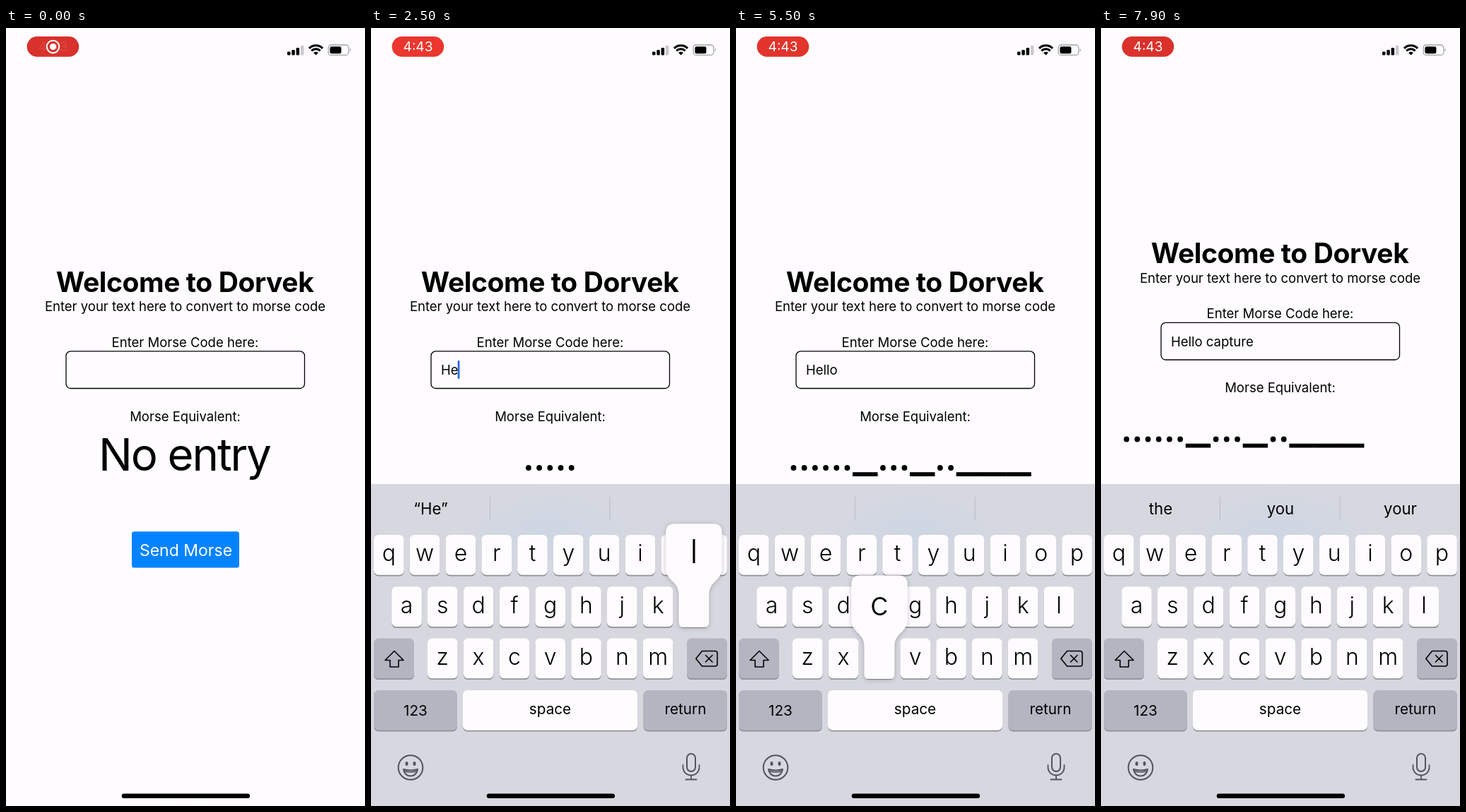
Recreate the animation shown at these times as an HTML page. Size 508 by 1102 pixels, loop 8 s.

```html
<!DOCTYPE html>
<html lang="en">
<head>
<meta charset="utf-8">
<title>Morse keyboard</title>
<style>
  html, body { margin: 0; width: 100%; height: 100%; overflow: hidden; background: #fefcff; }
  svg { display: block; width: 100%; height: 100%; }
  text { font-family: Inter, "Liberation Sans", sans-serif; font-size: 18.5px; white-space: pre; }
  .mid { text-anchor: middle; }
  .line { fill: none; stroke-linecap: round; stroke-linejoin: round; }
</style>
</head>
<body>
<svg id="stage" viewBox="0 0 508 1102" xmlns="http://www.w3.org/2000/svg">
  <defs>
    <radialGradient id="glow">
      <stop offset="0" stop-color="#c8d5e6" stop-opacity=".65"/>
      <stop offset="1" stop-color="#c8d5e6" stop-opacity="0"/>
    </radialGradient>
    <filter id="soft" x="-30%" y="-20%" width="160%" height="140%">
      <feDropShadow dx="0" dy="1" stdDeviation="3" flood-color="#000" flood-opacity=".25"/>
    </filter>
  </defs>
  <rect width="508" height="1102" fill="#fefcff"/>

  <rect id="pill" x="29.6" y="12" width="73.6" height="28.8" rx="14.4"/>
  <g id="rec">
    <circle cx="66.5" cy="26.5" r="8.8" fill="none" stroke="#fff" stroke-width="2"/>
    <circle cx="66.5" cy="26.5" r="4.6" fill="#fff"/>
  </g>
  <text id="clock" class="mid" x="66.5" y="33.3" fill="#fff" style="font-size:19px">4:43</text>

  <g id="status">
    <g fill="none" stroke="#000" stroke-width="3">
      <path d="M429 28.9A13.2 13.2 0 0 1 448 28.9"/>
      <path d="M432.4 32.5A8.4 8.4 0 0 1 444.6 32.5"/>
    </g>
    <path d="M438.5 38.6L435.2 35.2A4.7 4.7 0 0 1 441.8 35.2Z"/>
    <rect x="456.2" y="24" width="28.6" height="14.4" rx="4" fill="none" stroke="#a3a2a6" stroke-width="1.3"/>
    <rect x="458.4" y="26.2" width="16" height="10" rx="2.2"/>
    <path d="M486.6 28.8Q489.4 31.2 486.6 33.6Z" fill="#a3a2a6"/>
  </g>

  <g id="page">
    <text x="70.8" y="373.5" style="font-size:39px;font-weight:700;letter-spacing:-.4px">Welcome to Dorvek</text>
    <text class="mid" x="253.5" y="401">Enter your text here to convert to morse code</text>
    <text class="mid" x="253.5" y="451.7">Enter Morse Code here:</text>
    <rect x="85" y="457.8" width="337.5" height="52.7" rx="6.5" fill="none" stroke="#000" stroke-width="1.3"/>
    <text id="entry" x="99" y="491"></text>
    <rect id="caret" y="471" width="2.8" height="26" rx="1.2" fill="#2a6be0"/>
    <text class="mid" x="253.5" y="556.5">Morse Equivalent:</text>
    <text id="none" class="mid" x="252.5" y="627" style="font-size:63.5px;letter-spacing:-2.1px">No entry</text>
    <g id="code"></g>
    <g id="send">
      <rect x="178" y="713.3" width="152" height="51.2" rx="3.5" fill="#0583ff"/>
      <text class="mid" x="254.5" y="748" fill="#fff" style="font-size:23px">Send Morse</text>
    </g>
  </g>

  <g id="board">
    <rect y="646" width="508" height="490" fill="#d7d8df"/>
    <ellipse cx="254" cy="718" rx="145" ry="75" fill="url(#glow)"/>
    <path d="M168.5 664V698M338 664V698" stroke="#bcbec8" stroke-width="1.2"/>
    <g id="words"></g>
    <g id="keys"></g>
    <path id="shift" class="line" d="M33 882.5L46 895.5H39V905H27V895.5H20Z" stroke="#000" stroke-width="1.6"/>
    <path class="line" d="M468.5 882.5H487Q490 882.5 490 885.5V901Q490 904 487 904H468.5L459.8 893.2ZM473.5 888.5L483 898M483 888.5L473.5 898" stroke="#000" stroke-width="1.6"/>
    <g class="line" stroke="#50545c" stroke-width="2">
      <circle cx="56" cy="1047.5" r="17.3"/>
      <path d="M46 1050Q56 1053 66 1050Q64 1059.5 56 1059.5T46 1050Z"/>
      <path d="M46.5 1052.5Q56 1055.500 65.500 1052.500" stroke-width="1.500"/>
      <rect x="447" y="1028" width="12" height="25" rx="6"/>
      <path d="M441.5 1044V1047.5A11.5 11 0 0 0 464.5 1047.5V1044M453 1058.5V1064.5M445.5 1064.5H460.5" stroke-width="1.8"/>
    </g>
    <g fill="#50545c"><ellipse cx="50.5" cy="1042" rx="2" ry="2.9"/><ellipse cx="61.5" cy="1042" rx="2" ry="2.9"/></g>
    <g id="popup">
      <path id="bulb" fill="#fefcff" filter="url(#soft)"/>
      <text id="big" class="mid" style="font-weight:360"></text>
    </g>
  </g>
  <rect x="163.7" y="1084.6" width="181.4" height="6.4" rx="3.2"/>
</svg>
<script>
const LOOP = 8000, STEP = 100;
const LIGHT = '#fefcff', DARK = '#b3b6c1';
const MID = 253.3, DOT = 15.2, DASH = 35.3, MAX_LINE = 454;
const MORSE = { g: '--.', h: '....', e: '.', l: '.-..', o: '---', c: '-.-.',
  a: '.-', p: '.--.', t: '-', u: '..-', r: '.-.' };
// key, down, up
const PRESSES = [
  ['G', 1300, 1500], ['<', 1800, 1900], ['H', 2100, 2200], ['e', 2300, 2400],
  ['l', 2500, 2700], ['l', 2800, 2900], ['o', 3000, 3100], [' ', 4900, 5000],
  ['c', 5500, 5600], ['a', 5700, 5800], ['p', 5900, 6100], ['t', 6400, 6500],
  ['u', 6600, 6700], ['r', 6800, 6900], ['e', 7000, 7100], [' ', 7200, 7300]
];
const GUESSES = { 'G': ['G', 'G'], 'Hello': ['Hellos', 'Helloing'],
  'Hello cap': ['captain', 'capital'], 'Hello capture ': ['the', 'you', 'your'] };

const $ = id => document.getElementById(id);
function add(parent, tag, attrs, text) {
  const el = document.createElementNS('http://www.w3.org/2000/svg', tag);
  for (const k in attrs) el.setAttribute(k, attrs[k]);
  if (text) el.textContent = text;
  return parent.appendChild(el);
}
const show = (el, on) => el.setAttribute('visibility', on ? 'visible' : 'hidden');

[4.8, 7.4, 10.3, 13.6].forEach((h, i) => add($('status'), 'rect', {
  x: 398 + i * 6.3, y: 38.4 - h, width: 4.5, height: h, rx: 1.1, fill: i < 3 ? '#000' : '#cac9cd'
}));

const caps = {}, letters = {};
function cap(name, x, y, w, fill) {
  add($('keys'), 'rect', { x, y: y + 1.5, width: w, height: 57, rx: 6.5, fill: '#8f9198' });
  caps[name] = add($('keys'), 'rect', { x, y, width: w, height: 56.7, rx: 6.5, fill });
}
['qwertyuiop', 'asdfghjkl', 'zxcvbnm'].forEach((row, r) => {
  const first = [25.3, 50.5, 101.3][r], y = 718 + r * 73.3;
  [...row].forEach((ch, i) => {
    const cx = first + i * 50.8;
    cap(ch, cx - 21.3, y, 42.6, LIGHT);
    letters[ch] = { cx, y, el: add($('keys'), 'text', { class: 'mid', x: cx }, ch) };
  });
});
cap('shift', 4, 864.6, 57, DARK);
cap('<', 447, 864.6, 57, DARK);
cap('123', 4, 938, 118, DARK);
cap(' ', 130, 938, 247, LIGHT);
cap('return', 385.5, 938, 118.5, DARK);
[['123', 63, 974], ['space', 253.5, 972.3], ['return', 445, 972.3]].forEach(([s, x, y]) =>
  add($('keys'), 'text', { class: 'mid', x, y, style: 'font-size:20.7px' }, s));
const words = [84.5, 254, 423.5].map(x => add($('words'), 'text', { class: 'mid', x, y: 689 }));

function stateAt(t) {
  const s = { text: '', since: 100, key: null };
  for (const [key, down, up] of PRESSES) {
    if (t >= up) {
      s.text = key === '<' ? s.text.slice(0, -1) : s.text + key;
      s.since = up;
    } else if (t >= down) s.key = key;
  }
  return s;
}

const widthOf = line => [...line].reduce((w, c) => w + (c === '-' ? DASH : DOT), 0);

function morseLines(text) {
  const code = [...text.toLowerCase()].map(c => MORSE[c] || ' ').join('');
  const lines = [''];
  for (const part of code.match(/[.-]+ ?/g) || []) {
    const last = lines.length - 1;
    if (lines[last] && widthOf(lines[last] + part) > MAX_LINE) lines.push(part);
    else lines[last] += part;
  }
  return lines;
}

function drawMorse(lines) {
  const left = MID - Math.max(...lines.map(widthOf)) / 2;
  $('code').textContent = '';
  lines.forEach((line, n) => {
    let x = left;
    const y = 623 + n * 81;
    for (const c of line) {
      if (c === '.') add($('code'), 'circle', { cx: x + DOT / 2, cy: y, r: 3.9 });
      if (c === '-') add($('code'), 'rect', { x, y: y + 6.2, width: DASH + .2, height: 5.8 });
      x += c === '-' ? DASH : DOT;
    }
  });
}

function drawPopup(key, upper) {
  const k = key && letters[key.toLowerCase()];
  show($('popup'), k);
  if (!k) return;
  const { cx, y } = k, l = cx - 21.3, r = cx + 21.3, b = y + 57.5, T = y - 89;
  const L = Math.min(Math.max(cx - 39.5, 4), 425), R = L + 79;
  $('bulb').setAttribute('d', `M${L} ${T + 12}Q${L} ${T} ${L + 12} ${T}H${R - 12}Q${R} ${T} ${R} ${T + 12}
    V${y - 26}C${R} ${y - 8} ${r} ${y - 8} ${r} ${y + 11}V${b - 6}Q${r} ${b} ${r - 6} ${b}
    H${l + 6}Q${l} ${b} ${l} ${b - 6}V${y + 11}C${l} ${y - 8} ${L} ${y - 8} ${L} ${y - 26}Z`);
  const big = $('big');
  big.textContent = key;
  big.setAttribute('x', (L + R) / 2);
  big.setAttribute('y', y - (upper ? 32 : 33));
  big.style.fontSize = upper ? '44px' : '47px';
}

function drawWords(text, age) {
  const typed = text.split(' ').pop();
  const list = [typed ? `“${typed}”` : '', ...(GUESSES[text] || [])];
  if (!typed && list.length > 1) list.shift();
  const grow = Math.min(age / 300, 1);
  words.forEach((el, i) => {
    const fresh = i > 0 || !typed;
    el.textContent = list[i] || '';
    el.style.fontSize = (fresh && age < 100 ? 16.5 : 22.2) + 'px';
    el.setAttribute('opacity', fresh ? (age < 100 ? .17 : .42 + .58 * grow) : 1);
  });
}

function slide(t) {
  const p = Math.max(0, t - 50) * .0175;
  return t > 600 ? 0 : 456 * (1 + p) * Math.exp(-p);
}

function render(t) {
  const { text, since, key } = stateAt(t);
  const age = t - since, upper = text === '';

  const glow = (1 - Math.cos(t / 1950 * 2 * Math.PI)) / 2;
  $('pill').setAttribute('fill', `rgb(${217 + 30 * glow},${49 + 9 * glow},${43 + 5 * glow})`);
  const rec = t < 400 ? [1, .6, .25, .08][Math.floor(t / 100)] : 0;
  $('rec').setAttribute('opacity', rec);
  $('clock').setAttribute('opacity', rec === 1 ? .1 : 1 - rec);

  const lines = morseLines(text);
  $('page').setAttribute('transform', `translate(0 ${-40.5 * (lines.length - 1)})`);
  $('send').setAttribute('transform', `translate(0 ${81 * (lines.length - 1)})`);
  $('entry').textContent = text;
  $('caret').setAttribute('x', 99.3 + (text ? $('entry').getComputedTextLength() - 1.2 : 0));
  show($('caret'), age >= 0 && age % 1000 < 500);
  show($('none'), upper);
  drawMorse(lines);

  $('board').setAttribute('transform', `translate(0 ${slide(t)})`);
  for (const ch in letters) {
    const { el, y } = letters[ch];
    el.textContent = upper ? ch.toUpperCase() : ch;
    el.setAttribute('y', y + (upper ? 40.3 : 37.3));
    el.style.fontSize = upper ? '30px' : '32px';
    el.style.fontWeight = upper ? 400 : 340;
  }
  $('shift').style.fill = upper ? '#000' : 'none';
  caps.shift.setAttribute('fill', upper ? LIGHT : DARK);
  caps['<'].setAttribute('fill', key === '<' ? LIGHT : DARK);
  caps[' '].setAttribute('fill', key === ' ' ? DARK : LIGHT);
  drawWords(text, age);
  drawPopup(key, upper);
}

const start = performance.now();
let shown = -1;
function tick() {
  const t = Math.floor((performance.now() - start) % LOOP / STEP) * STEP;
  if (t !== shown) render(shown = t);
  requestAnimationFrame(tick);
}
tick();
</script>
</body>
</html>
```
